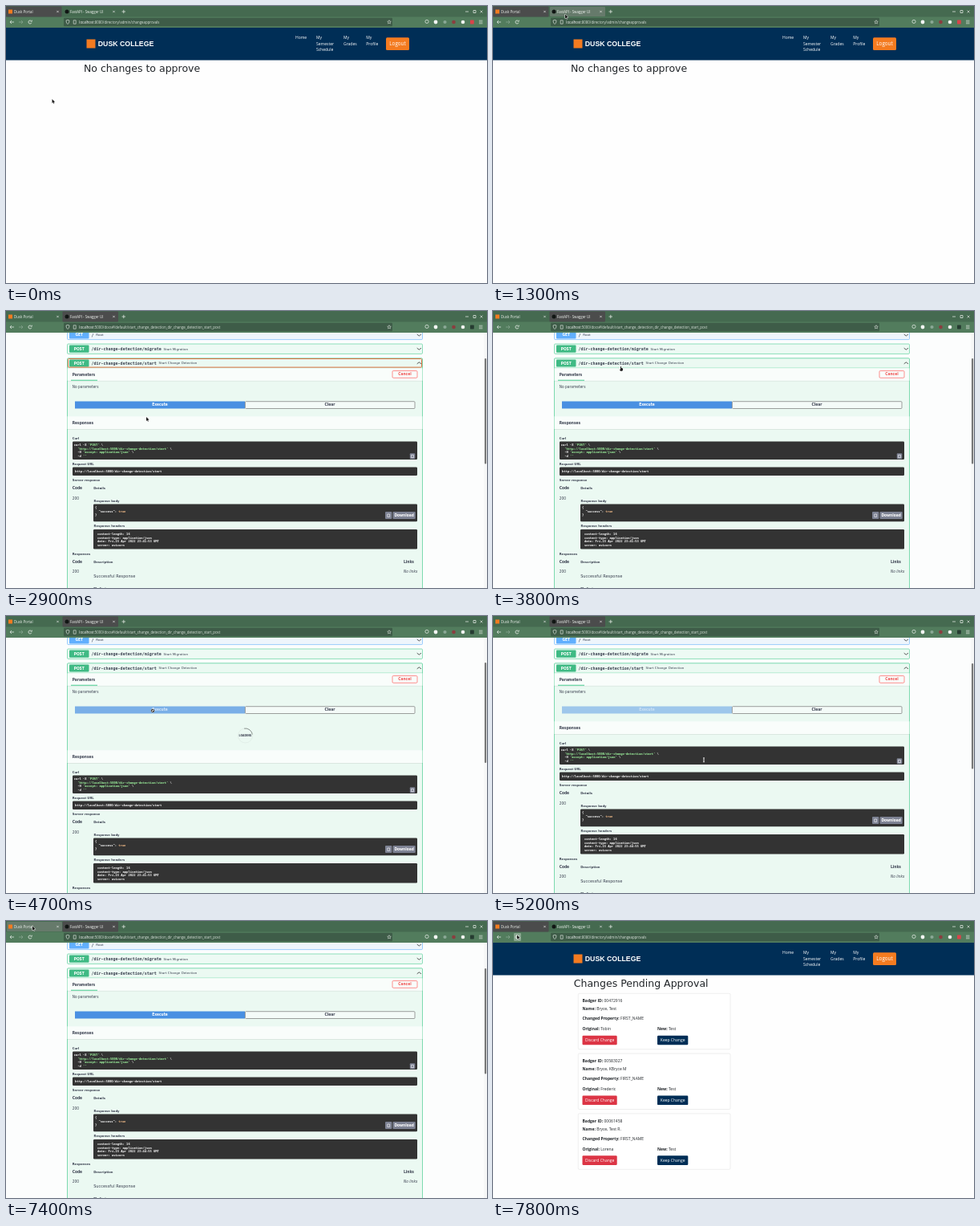
Recreate the animation shown at these times as an HTML page with a canvas. Size 600x345 px, loop 8 s.

```html
<!DOCTYPE html>
<html lang="en">
<head>
<meta charset="utf-8">
<title>Change approvals</title>
<style>
html, body { margin: 0; width: 100%; height: 100%; overflow: hidden; background: #fefefe; }
canvas { display: block; width: 600px; height: 345px; }
</style>
</head>
<body>
<canvas id="stage" width="600" height="345"></canvas>
<script>
const ctx = document.getElementById('stage').getContext('2d');
const LOOP = 8000, STEP = 100;
const SCALE = 600 / 1920; // font sizes are in desktop pixels
const UI = '"Open Sans", "Noto Sans", sans-serif';
const SANS = '"DejaVu Sans", sans-serif';
const MONO = '"DejaVu Sans Mono", monospace';
const INK = '#3b4151', GREEN = '#49cc90', NAVY = '#002e56';

// time, x, y of the pointer tip
const POINTER = [
  [0, 57.5, 116], [100, 62, 119], [200, 90, 132], [300, 160, 146], [400, 225, 138],
  [500, 258, 110], [600, 240, 80], [700, 195, 75], [900, 125, 117],
  [1000, 118, 94], [1200, 96, 20], [1300, 90, 10.5], [1900, 90, 10.5],
  [2000, 100, 30], [2200, 151, 128], [2300, 151, 128], [2700, 175, 132], [3200, 175, 132],
  [3300, 173, 125], [3600, 151, 68], [3800, 159, 69], [4100, 186, 117], [4300, 183, 117],
  [4800, 183, 117], [5200, 263, 179], [6100, 263, 179], [6300, 259, 175], [6400, 259, 175],
  [6800, 190, 118], [7300, 33, 6.5], [7500, 33, 6.5], [7700, 30, 17.5], [8000, 30, 17.5]
];

const clamp01 = v => Math.max(0, Math.min(1, v));

function pointerAt(t) {
  const i = Math.max(1, POINTER.findIndex(p => p[0] >= t));
  const [t0, x0, y0] = POINTER[i - 1], [t1, x1, y1] = POINTER[i];
  const k = clamp01((t - t0) / (t1 - t0));
  return { x: x0 + (x1 - x0) * k, y: y0 + (y1 - y0) * k };
}

function box(x, y, w, h, fill, { r = 0, stroke, line = 0.5 } = {}) {
  ctx.beginPath();
  ctx.roundRect(x, y, w, h, r);
  if (fill) { ctx.fillStyle = fill; ctx.fill(); }
  if (stroke) { ctx.strokeStyle = stroke; ctx.lineWidth = line; ctx.stroke(); }
}

function path(points, color, width = 0.7) {
  ctx.beginPath();
  points.forEach(([x, y]) => ctx.lineTo(x, y));
  ctx.strokeStyle = color;
  ctx.lineWidth = width;
  ctx.stroke();
}

function arc(x, y, r, color, width = 0.7, from = 0, to = 2 * Math.PI) {
  ctx.beginPath();
  ctx.arc(x, y, r, from, to);
  ctx.strokeStyle = color;
  ctx.lineWidth = width;
  ctx.stroke();
}

function dot(x, y, r, color) {
  ctx.beginPath();
  ctx.arc(x, y, r, 0, 2 * Math.PI);
  ctx.fillStyle = color;
  ctx.fill();
}

// y is the middle of the capitals; returns the x after the text
function text(str, x, y, { size = 14, style = '', font = SANS, color = INK, align = 'left' } = {}) {
  ctx.save();
  ctx.translate(x, y + size * SCALE * 0.36);
  ctx.scale(SCALE, SCALE);
  ctx.font = `${style} ${size}px ${font}`;
  ctx.fillStyle = color;
  ctx.textAlign = align;
  ctx.fillText(str, 0, 0);
  const width = ctx.measureText(str).width * SCALE;
  ctx.restore();
  return x + width;
}

const bold = (str, x, y, size = 12, more = {}) => text(str, x, y, { size, style: 'bold', ...more });
const code = (str, x, y, color = '#fff') => text(str, x, y, { size: 12, style: 'bold', font: MONO, color });

// ---- browser frame ----
function cross(x, y, r, color = '#eee') {
  path([[x - r, y - r], [x + r, y + r]], color, 0.6);
  path([[x - r, y + r], [x + r, y - r]], color, 0.6);
}

function browser(docs, hover, reloadHover) {
  const pale = '#eef2ee', dim = '#8fa996';
  box(0, 0, 600, 14, '#456a50');
  box(0, 13.5, 600, 13.5, '#527c5d');
  if (hover >= 0) box(hover * 70 + 1, 1, 69, 12, '#667a6b', { r: 1 });
  box(docs ? 70.5 : 0, 0.5, 69.5, 13, '#4b4c4c', { r: 1 });

  box(3, 4.5, 5, 5, '#f47b20');
  dot(76, 7, 2.5, '#111614');
  text('Dusk Portal', 10, 7, { font: UI, color: pale });
  text('FastAPI - Swagger UI', 80, 7, { font: UI, color: pale });
  cross(64.5, 7, 1.2);
  cross(134.5, 7, 1.2);
  path([[144.5, 7], [149, 7]], pale);
  path([[146.75, 4.8], [146.75, 9.2]], pale);
  path([[573, 7], [577, 7]], pale);
  box(583, 5.5, 3, 3, null, { stroke: pale, line: 0.7 });
  cross(593, 7, 1.5);

  path([[10, 20], [5, 20]], pale);
  path([[7, 18], [5, 20], [7, 22]], pale);
  path([[16, 20], [21, 20]], dim);
  path([[19, 18], [21, 20], [19, 22]], dim);
  if (reloadHover) box(26, 15, 9, 10, '#87a58e', { r: 1 });
  arc(30, 20, 2, pale, 0.8, 0.4, 5.4);
  path([[32.3, 17.6], [32.3, 19.2], [30.6, 19.2]], pale, 0.7);

  box(72, 14.7, 410, 10.6, '#3e5c48', { r: 1.2 });
  path([[75, 18], [77, 17.3], [79, 18], [78.5, 21], [77, 22.6], [75.5, 21], [75, 18]], pale, 0.6);
  box(84.2, 17.8, 3, 4.4, null, { stroke: pale, line: 0.6 });
  const end = text('localhost', 91.3, 20, { font: UI, color: '#fff' });
  const rest = docs
    ? ':5000/docs#/default/start_change_detection_dir_change_detection_start_post'
    : ':8080/directory/admin/changeapprovals';
  text(rest, end, 20, { font: UI, color: '#dbe4dc' });

  ctx.beginPath();
  for (let i = 0; i < 10; i++) {
    const a = i * Math.PI / 5 - Math.PI / 2, r = i % 2 ? 1.1 : 2.4;
    ctx.lineTo(478 + r * Math.cos(a), 20 + r * Math.sin(a));
  }
  ctx.closePath();
  ctx.strokeStyle = pale;
  ctx.lineWidth = 0.5;
  ctx.stroke();

  arc(525, 19.4, 2.1, pale, 0.7);
  dot(536, 20, 2.4, '#f3f5f3');
  dot(547.5, 20, 2.1, '#8aa895');
  dot(558.5, 20, 2.3, '#8b3d3f');
  dot(570, 20, 2.3, '#f1f3f1');
  box(579, 17.6, 4.8, 4.8, docs ? '#263b31' : '#d8444a', { r: 0.6 });
  [18.2, 20, 21.8].forEach(y => path([[590, y], [594.5, y]], pale, 0.6));
}

// ---- portal page ----
function fact(label, value, x, y) {
  const end = text(label + ' ', x, y, { size: 16, style: 'bold', font: UI, color: '#212529' });
  text(value, end, y, { size: 16, font: UI, color: '#212529' });
}

function button(label, x, y, w, color) {
  box(x, y, w, 11.6, color, { r: 1.2 });
  text(label, x + w / 2, y + 5.8, { size: 16, font: UI, color: '#fff', align: 'center' });
}

const CHANGES = [
  { id: '00472916', name: 'Bryce, Test', old: 'Tobin' },
  { id: '00583027', name: 'Bryce, KBryce M', old: 'Frederic' },
  { id: '00061458', name: 'Bryce, Test R.', old: 'Lorena' }
];

function card({ id, name, old }, i) {
  const y = 90.3 + i * 74.8;
  box(106.3, y, 189.7, 69.4, '#fff', { r: 1.2, stroke: '#dcdcdc' });
  fact('Badger ID:', id, 111.5, y + 8.8);
  fact('Name:', name, 111.5, y + 18.8);
  fact('Changed Property:', 'FIRST_NAME', 111.5, y + 31.3);
  fact('Original:', old, 111.5, y + 43.8);
  fact('New:', 'Test', 205, y + 43.8);
  button('Discard Change', 111.5, y + 52.4, 43.2, '#dc3545');
  button('Keep Change', 205, y + 52.4, 38.3, NAVY);
}

function portal(pending) {
  box(0, 27, 600, 318, '#fefefe');
  box(0, 27, 600, 40.5, NAVY);
  box(100.5, 41.5, 11, 11, '#f47b20');
  text('DUSK COLLEGE', 114.8, 47, { size: 28, style: 'bold', font: '"Liberation Sans", sans-serif', color: '#fff' });
  const links = [[361, 'Home'], [387, 'My', 'Semester', 'Schedule'], [421, 'My', 'Grades'], [449.3, 'My', 'Profile']];
  links.forEach(([x, ...lines]) => lines.forEach((s, i) =>
    text(s, x, 39.2 + i * 7.5, { size: 16, font: UI, color: '#fff' })));
  box(474, 39.3, 29, 15.8, '#f47b20', { r: 1.5 });
  text('Logout', 488.5, 47.2, { size: 20, font: UI, color: '#fff', align: 'center' });

  const heading = { size: 40, color: '#212529' };
  if (pending) {
    text('Changes Pending Approval', 100.8, 77, heading);
    CHANGES.forEach(card);
  } else {
    text('No changes to approve', 97, 77, heading);
  }
}

// ---- API docs page ----
function chevron(y, dir) {
  path([[512.7, y - dir], [515.3, y + dir], [517.9, y - dir]], '#333', 0.8);
}

function endpoint(method, route, summary, y, color) {
  box(79, y - 4.6, 24.5, 9.2, color, { r: 1 });
  bold(method, 91.2, y, 14, { color: '#fff', align: 'center' });
  const end = text(route, 106.5, y, { size: 16, style: 'bold', font: MONO });
  text(summary, end + 2.8, y, { size: 13 });
}

function sectionBar(y, h) {
  box(76.6, y + h, 442.8, 0.6, 'rgba(0,0,0,.1)');
  box(76.6, y, 442.8, h, '#f9fdfb');
}

const dark = (x, y, h) => box(x, y, 513 - x, h, '#333', { r: 1.2 });

function copyButton(x, y, w, h) {
  box(x, y, w, h, '#7d8293', { r: 1 });
  box(x + w / 2 - 1.4, y + h / 2 - 1.5, 2.8, 3.4, null, { stroke: '#fff', line: 0.6 });
}

function spinner(y, t) {
  const turn = t / 1000 * 2 * Math.PI, q = Math.PI / 4;
  ctx.globalAlpha = 0.5 + 0.5 * Math.abs(Math.cos(t / 1000 * Math.PI));
  arc(298.5, y, 9, 'rgba(85,85,85,.1)', 0.65);
  arc(298.5, y, 9, 'rgba(0,0,0,.6)', 0.65, turn - 3 * q, turn - q);
  bold('LOADING', 298.5, y, 10, { align: 'center' });
  ctx.globalAlpha = 1;
}

function responses(stamp) {
  const green = '#a2fca2', url = 'http://localhost:5000/dir-change-detection/start';
  sectionBar(131.3, 15.8);
  bold('Responses', 82.7, 139, 14);

  bold('Curl', 82.7, 158.5);
  dark(83, 162.6, 22.4);
  let end = code('curl -X ', 84.8, 166.8);
  end = code("'POST'", end, 166.8, green);
  code(' \\', end, 166.8);
  end = code(`  '${url}'`, 84.8, 171.4, green);
  code(' \\', end, 171.4);
  end = code('  -H ', 84.8, 176);
  end = code("'accept: application/json'", end, 176, green);
  code(' \\', end, 176);
  end = code('  -d ', 84.8, 180.6);
  code("''", end, 180.6, green);
  copyButton(503.8, 177.3, 6.4, 7);

  bold('Request URL', 82.7, 190.2);
  dark(83, 194.6, 10.4);
  code(url, 86, 199.7);

  bold('Server response', 82.7, 210.6);
  bold('Code', 82.7, 220.8, 14);
  bold('Details', 109.2, 220.8);
  text('200', 82.7, 233.3);
  bold('Response body', 109.5, 236.5);
  dark(109, 240.5, 21.7);
  code('{', 111, 244.5);
  end = code('  "success": ', 111, 249.2);
  code('true', end, 249.2, '#fcc28c');
  code('}', 111, 253.8);
  copyButton(473, 250, 8.4, 9);
  box(482.5, 250, 28.2, 9, '#7d8293', { r: 1 });
  bold('Download', 496.6, 254.3, 14, { color: '#fff', align: 'center' });

  bold('Response headers', 109.5, 268);
  dark(109, 272, 24.5);
  ['content-length: 16', 'content-type: application/json', `date: Fri,15 Apr 2022 ${stamp} GMT`, 'server: uvicorn']
    .forEach((s, i) => code(s, 114, 277.5 + i * 4.7));

  bold('Responses', 82.7, 302.3);
  bold('Code', 82.7, 312.5, 14);
  bold('Description', 109.2, 312.5);
  bold('Links', 496, 312.5, 14);
  text('200', 82.7, 324.7);
  text('Successful Response', 109.2, 330, { size: 16 });
  text('No links', 496, 324.7, { style: 'italic' });
  bold('Media type', 109.2, 345.8);
}

function executeAlpha(t) {
  if (t < 5200) return 1 - 0.7 * clamp01((t - 4570) / 300);
  return 0.48 + 0.52 * clamp01((t - 5200) / 300);
}

function docsPage(t) {
  const loading = t >= 4600 && t < 5200, green = '#3fba84';
  box(0, 27, 600, 318, '#fcfdfd');

  box(76.5, 22, 443, 13.6, '#eef5fc', { r: 1.2, stroke: '#61affe', line: 0.6 });
  endpoint('GET', '/', 'Root', 29.8, '#61affe');
  chevron(30, 1);
  box(76.5, 41, 443, 12.4, '#edfaf4', { r: 1.2, stroke: GREEN, line: 0.6 });
  endpoint('POST', '/dir-change-detection/migrate', 'Start Migration', 47.2, green);
  chevron(47.2, 1);

  box(76.5, 58.8, 443, 300, '#ebf9f2', { r: 1.2, stroke: GREEN, line: 0.7 });
  endpoint('POST', '/dir-change-detection/start', 'Start Change Detection', 65, green);
  chevron(64.8, -1);
  path([[76.5, 71], [519.5, 71]], GREEN, 0.5);
  if (t < 3100) box(77.5, 59.5, 441, 10.6, null, { r: 1, stroke: '#e2622f', line: 0.9 });

  sectionBar(71.3, 15.5);
  bold('Parameters', 82.7, 79, 14);
  box(81, 85.7, 33, 1.1, GREEN);
  box(482, 74.5, 31, 8.8, null, { r: 1.2, stroke: '#ff6060', line: 0.7 });
  bold('Cancel', 497.5, 78.9, 14, { color: '#f05050', align: 'center' });
  text('No parameters', 82.7, 94.2);

  ctx.globalAlpha = executeAlpha(t);
  box(86, 112.6, 212, 9, '#4990e2');
  bold('Execute', 192, 116.9, 14, { color: '#fff', align: 'center' });
  ctx.globalAlpha = 1;
  box(298.4, 112.7, 211.6, 8.8, '#f4fbf8', { r: 1, stroke: '#777', line: 0.7 });
  bold('Clear', 404, 116.9, 14, { align: 'center' });

  if (loading) spinner(149, t - 4600);
  ctx.save();
  if (loading) ctx.translate(0, 36);
  responses(t < 5200 ? '23:41:53' : '23:44:55');
  ctx.restore();

  box(596, 27, 4, 318, '#f6f7f7');
  box(597, loading ? 58 : 59, 2.2, loading ? 125 : 131.5, '#777', { r: 1.1 });
}

// ---- pointer ----
function shape(points, x, y) {
  ctx.beginPath();
  points.forEach(([px, py]) => ctx.lineTo(x + px, y + py));
  ctx.closePath();
  ctx.strokeStyle = '#fff';
  ctx.lineWidth = 0.9;
  ctx.stroke();
  ctx.fillStyle = '#1c1c1c';
  ctx.fill();
}

const ARROW = [[0, 0], [0, 5], [1.2, 4], [2, 5.8], [2.8, 5.4], [2, 3.7], [3.6, 3.6]];
const HAND = [[0, 0], [0.8, 0], [1, 2], [3, 2.6], [3, 4.4], [2.2, 5.8], [0, 5.8], [-1.4, 3.5], [0, 4]];

function pointer(t) {
  const { x, y } = pointerAt(t);
  const docs = t >= 1700 && t < 7500;
  const overRow = docs && y > 59 && y < 71;
  const overExecute = docs && y > 112 && y < 122 && x > 86 && x < 298 && t >= 4000 && t < 5200;
  const overCode = docs && t >= 5100 && y > 162 && y < 185;
  if (overExecute && t >= 4600) {
    dot(x, y + 1, 2.4, '#fff');
    arc(x, y + 1, 1.8, '#222', 0.9);
    path([[x - 1.2, y - 0.2], [x + 1.2, y + 2.2]], '#222', 0.8);
  } else if (overRow || overExecute) {
    shape(HAND, x, y);
  } else if (overCode) {
    path([[x, y - 2.4], [x, y + 3]], '#fff', 1.4);
    path([[x, y - 2], [x, y + 2.6]], '#222', 0.6);
    path([[x - 1, y - 2.2], [x + 1, y - 2.2]], '#ddd', 0.6);
    path([[x - 1, y + 2.8], [x + 1, y + 2.8]], '#ddd', 0.6);
  } else {
    shape(ARROW, x, y);
  }
}

function draw(t) {
  const docs = t >= 1700 && t < 7500;
  if (docs) docsPage(t); else portal(t >= 7800);
  const hover = t >= 1300 && t < 1700 ? 1 : t >= 7300 && t < 7500 ? 0 : -1;
  browser(docs, hover, t >= 7700);
  pointer(t);
}

function tick(now) {
  draw(Math.floor(now % LOOP / STEP) * STEP);
  requestAnimationFrame(tick);
}
requestAnimationFrame(tick);
</script>
</body>
</html>
```
